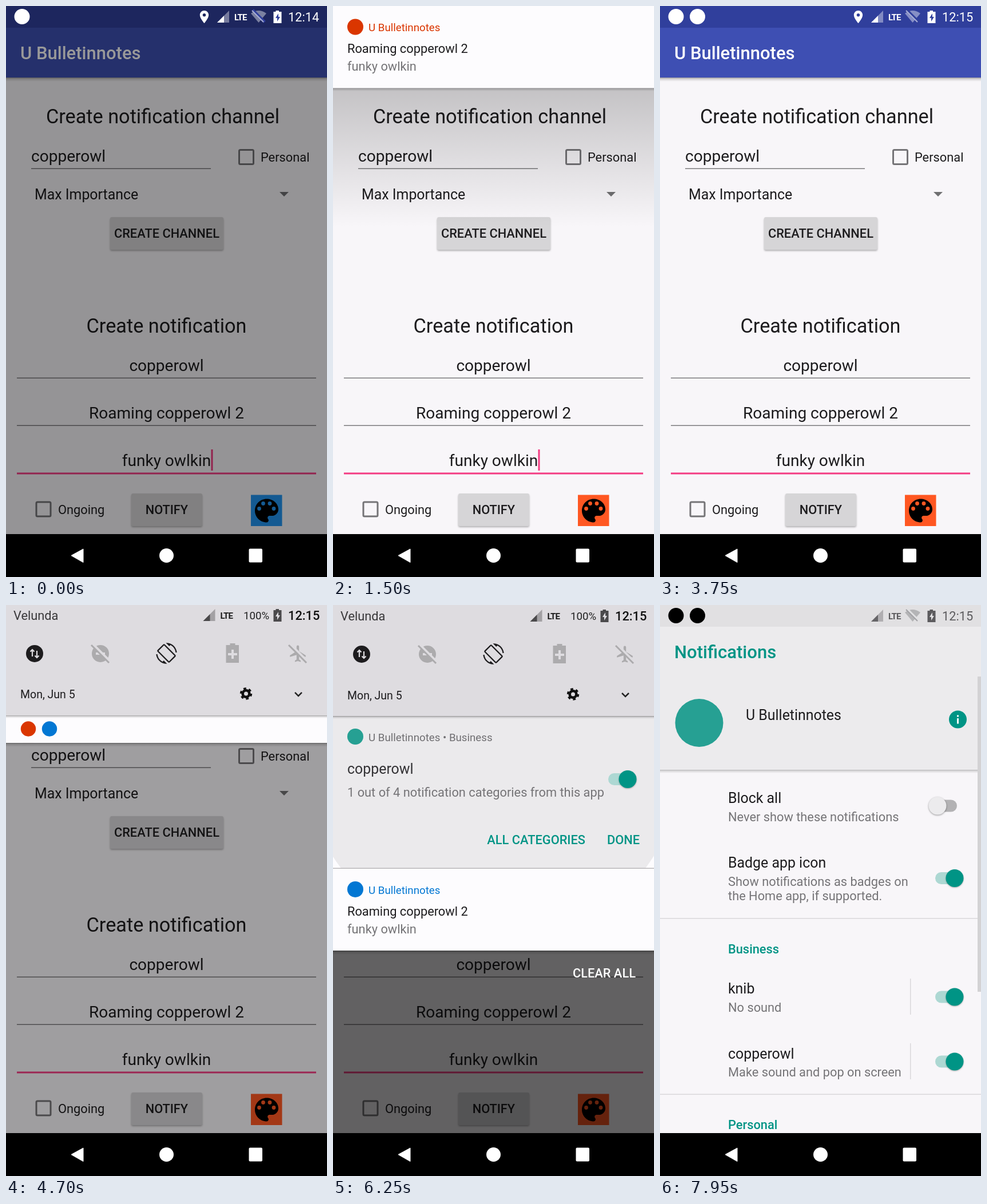
Animation of 561 by 998 pixels, one loop 8000 ms. Source, as an HTML page:

```html
<!DOCTYPE html>
<html lang="en">
<head>
<meta charset="utf-8">
<title>Notification channels</title>
<style>
html, body { margin: 0; width: 100%; height: 100%; overflow: hidden; background: #000; }
svg { display: block; width: 100vw; height: 100vh; font-family: Roboto, "Noto Sans", sans-serif; }
text { white-space: pre; }
</style>
</head>
<body>
<svg id="stage" viewBox="0 0 561 998"></svg>
<script>
const LOOP = 8000;
const W = 561, NAV = 923, HEAD = 194, SHELF = 48;
const INK = '#1d1c1e', SOFT = '#757477', TEAL = '#009485', PINK = '#f43a82', PAPER = '#f8f6f9', CARD = '#fdfcfe';
const ORANGE = '#da3600', BLUE = '#0277d3', QS = '#dedce0';
const APP = 'U Bulletinnotes', CHANNEL = 'copperowl', TITLE = 'Roaming copperowl 2', BODY = 'funky owlkin';

// drawing helpers
const text = (x, y, size, str, fill = INK, anchor = 'start', weight = 400, extra = '') =>
  `<text x="${x}" y="${y}" font-size="${size}" fill="${fill}" text-anchor="${anchor}" font-weight="${weight}" ${extra}>${str}</text>`;
const rect = (x, y, w, h, fill, extra = '') => `<rect x="${x}" y="${y}" width="${w}" height="${h}" fill="${fill}" ${extra}/>`;
const disc = (x, y, r, fill, extra = '') => `<circle cx="${x}" cy="${y}" r="${r}" fill="${fill}" ${extra}/>`;
const path = (d, fill, extra = '') => `<path d="${d}" fill="${fill}" ${extra}/>`;
const line = (d, color, width, extra = '') => path(d, 'none', `stroke="${color}" stroke-width="${width}" ${extra}`);
const group = (id, body, extra = '') => `<g id="${id}" ${extra}>${body}</g>`;
const icon = (cx, cy, s, d, fill) => path(d, fill, `fill-rule="evenodd" transform="translate(${cx} ${cy}) scale(${s}) translate(-12 -12)"`);
const checkbox = (x, y) => rect(x, y, 25, 25, 'none', 'rx="2" stroke="#757477" stroke-width="3"');
const button = (id, x, y, w, h, label) =>
  rect(x, y, w, h, '#d6d5d7', `id="${id}" rx="3" style="filter:drop-shadow(0 2px 1.5px rgba(0,0,0,.28))"`) +
  text(x + w / 2, y + 36, 21.8, label, INK, 'middle', 500);

const PALETTE = 'M12 3c-4.97 0-9 4.03-9 9s4.03 9 9 9c.83 0 1.5-.67 1.5-1.5 0-.39-.15-.74-.39-1.01-.23-.26-.38-.61-.38-.99 0-.83.67-1.5 1.5-1.5H16c2.76 0 5-2.24 5-5 0-4.42-4.03-8-9-8z';
const PIN = 'M12 2C8.13 2 5 5.13 5 9c0 5.25 7 13 7 13s7-7.75 7-13c0-3.87-3.13-7-7-7zm0 9.5a2.5 2.5 0 1 1 0-5 2.5 2.5 0 0 1 0 5z';
const PLANE = 'M13.5 9V3.5a1.5 1.5 0 0 0-3 0V9l-8 5v2l8-2.5V19l-2 1.5V22l3.5-1 3.5 1v-1.5L13.5 19v-5.5l8 2.5v-2z';
const ROTATE = 'M16.48 2.52c3.27 1.55 5.61 4.72 5.97 8.48h1.5C23.44 4.84 18.29 0 12 0l-.66.03 3.81 3.81zM10.23 1.75c-.59-.59-1.54-.59-2.12 0L1.75 8.11c-.59.59-.59 1.54 0 2.12l12.02 12.02c.59.59 1.54.59 2.12 0l6.36-6.36c.59-.59.59-1.54 0-2.12zM14.83 21.19L2.81 9.17l6.36-6.36 12.02 12.02zM7.52 21.48C4.25 19.94 1.91 16.76 1.55 13H.05C.56 19.16 5.71 24 12 24l.66-.03-3.81-3.81z';

const signal = (dx, color, ink) => `<g transform="translate(${dx} 0)">` +
  path('M369 29H390V8Z', color, 'opacity=".4"') + path('M369 29H381V17Z', color) +
  text(399, 25, 15, 'LTE', ink, 'start', 700, 'letter-spacing="-1"') + '</g>';
const battery = (color, bolt) => path('M471.5 10V8h5.500v2h4.500v20h-14V10Z', color) +
  path('M476 13l-5 8h3v6l5-8h-3z', bolt);
const wifiOff = (color, back) => path('M428 13Q441.500 3 455 13L441.500 29Z', color, 'opacity=".42"') +
  line('M431 7L452 28', back, 5) + line('M430 8L450 28', color, 2, 'opacity=".6"');
const dots = (color, id) => disc(28, 18.5, 13.5, color) + disc(65.5, 18.5, 13.5, color, `id="${id}"`);

function toggle(y, on = true) {
  return on
    ? rect(481, y - 10.5, 40, 21, '#add8d3', 'rx="10.5"') + disc(515, y, 15.5, TEAL, 'style="filter:drop-shadow(0 1px 1px rgba(0,0,0,.3))"')
    : rect(480, y - 10.5, 39, 21, '#b3b2b4', 'rx="10.5"') + disc(485, y, 15.5, '#ecebed', 'style="filter:drop-shadow(0 1px 1.5px rgba(0,0,0,.4))"');
}

function appScreen() {
  const field = (y, str) => text(280.5, y, 28.05, str, INK, 'middle');
  const rule = (x, y, w) => rect(x, y, w, 1.5, '#7b7a7c');
  return rect(0, 0, W, NAV, PAPER) +
    rect(0, 125, W, 7, 'url(#under)') +
    rect(0, 38, W, 87, '#3e4fb3') + rect(0, 0, W, 38, '#303f9c') +
    text(25, 93, 31, APP, '#fff', 'start', 500) +
    text(274, 205, 34.28, 'Create notification channel', INK, 'middle') +
    text(44, 272, 28.05, CHANNEL) + rule(44, 283.5, 314) +
    checkbox(407.5, 251.5) + text(445, 272, 21.8, 'Personal') +
    text(50, 337.5, 24.9, 'Max Importance') + path('M478 325H494L486 333Z', '#707072') +
    button('create', 182, 369, 198, 57, 'CREATE CHANNEL') +
    text(280.5, 570.5, 34.28, 'Create notification', INK, 'middle') +
    field(638, CHANNEL) + rule(19, 649.5, 523) +
    field(721, TITLE) + rule(19, 732.5, 523) +
    field(804, BODY) + rect(19, 815.5, 523, 3, PINK) +
    rect(358.5, 775, 3, 37, PINK, 'id="caret"') +
    checkbox(53, 867) + text(91, 888, 21.8, 'Ongoing') +
    button('notify', 219, 852, 124, 57, 'NOTIFY') +
    rect(428, 854.5, 54.5, 54.5, BLUE, 'id="swatch"') + icon(455.5, 882, 2.28, PALETTE, '#000') +
    group('wells', [[442.500, 878.5], [449.500, 869.500], [461, 869.500], [468, 878.500]].map(p => disc(...p, 3.4, 'inherit')).join(''));
}

function settingsScreen() {
  const row = (y, name, lines) => text(119, y, 24.9, name) +
    lines.map((s, i) => text(119, y + 31.5 + i * 25.6, 21.8, s, SOFT)).join('');
  const section = (y, s) => text(119, y, 21.8, s, TEAL, 'start', 500);
  const split = y => rect(0, y, W, 1.5, '#d9d7da');
  const bar = y => rect(437, y, 1.5, 63, '#dad8db');
  return rect(0, 0, W, NAV, PAPER) +
    rect(0, 287, W, 7, 'url(#under)') + rect(0, 0, W, 288, '#ecebed') + rect(0, 0, W, 38, '#e1e0e2') +
    text(25, 93, 31, 'Notifications', TEAL, 'start', 500) +
    disc(68.5, 206, 42, '#26a093') + text(150, 201, 24.9, APP) +
    disc(520.5, 200, 15.5, TEAL) + rect(519, 198, 3, 9.5, '#fff') + rect(519, 192.5, 3, 3, '#fff') +
    row(346, 'Block all', ['Never show these notifications']) + toggle(351, false) +
    row(459, 'Badge app icon', ['Show notifications as badges on', 'the Home app, if supported.']) + toggle(477.5) +
    split(547) + section(609, 'Business') +
    row(679, 'knib', ['No sound']) + bar(653) + toggle(685) +
    row(792.5, CHANNEL, ['Make sound and pop on screen']) + bar(766) + toggle(798) +
    split(854.5) + section(915.5, 'Personal') +
    rect(555, 125, 6, 551, '#d3d2d4');
}

const card = (color) => rect(0, 0, W, 143.5, CARD) + disc(39, 36.5, 14, color) +
  text(62, 44, 18.7, APP, color) + text(25, 82, 21.8, TITLE) + text(25, 113, 21.8, BODY, SOFT);

// channel settings revealed behind the first card
const guts = () => rect(0, HEAD, W, 267, '#ebeaec') + disc(39, 230, 14, '#26a093') +
  text(62, 237.5, 18.7, APP + ' • Business', '#706f72') + text(25, 295, 24.9, CHANNEL, '#333235') +
  text(25, 335, 21.8, '1 out of 4 notification categories from this app', SOFT) + toggle(304.5) +
  text(441, 418, 21.8, 'ALL CATEGORIES', TEAL, 'end', 500) + text(536, 418, 21.8, 'DONE', TEAL, 'end', 500);

function quickSettings() {
  const off = '#acabad', cut = x => line(`M${x - 14} 70L${x + 17} 101`, QS, 6) + line(`M${x - 16} 71L${x + 15} 102`, off, 3);
  return rect(0, -300, W, HEAD + 300, QS) + rect(0, HEAD, W, 5, 'url(#under)') +
    text(13, 27, 21.8, 'Velunda', '#3a393b') + signal(-24.5, '#4a494b', '#1c1c1c') +
    text(415, 26, 18.7, '100%', '#222') + battery('#4a494b', QS) + text(493, 27, 21.8, '12:15', '#111', 'start', 500) +
    disc(50, 86, 15, INK) + line('M46 91V79M42.500 82.500L46 79L49.500 82.500M54 81V93M50.500 89.500L54 93L57.500 89.500', QS, 2.2) +
    disc(165, 86, 15, off) + rect(157, 84, 16, 4, QS) + cut(165) +
    icon(280.5, 85.5, 1.52, ROTATE, INK) +
    path('M391.500 71V68h9v3h6.500v31h-22.500V71Z', off) + line('M396 79V95M388 87H404', QS, 4) +
    icon(510, 86, 1.45, PLANE, off) + cut(510) +
    text(25, 164.5, 19.5, 'Mon, Jun 5') +
    disc(419.5, 156, 5.8, 'none', 'stroke="#111" stroke-width="4.6"') +
    disc(419.5, 156, 8.5, 'none', 'stroke="#111" stroke-width="4.4" stroke-dasharray="4.45"') +
    line('M505 154L511 160L517 154', '#222', 2.5);
}

const grad = (id, ...stops) => `<linearGradient id="${id}" x2="0" y2="1">` +
  stops.map(([o, a]) => `<stop offset="${o}" stop-opacity="${a}"/>`).join('') + '</linearGradient>';

document.getElementById('stage').innerHTML =
  '<defs>' + grad('under', [0, .38], [.35, .15], [1, 0]) + grad('dusk', [0, .32], [.373, .21], [1, 0]) +
  `<clipPath id="panelClip">${rect(0, 0, W, 0, '#000', 'id="panelBox"')}</clipPath>` +
  `<clipPath id="gutsClip">${disc(280, 265, 0, '#000', 'id="gutsHole"')}</clipPath></defs>` +
  group('app', appScreen()) + group('settings', settingsScreen()) +
  rect(0, 0, W, NAV, '#000', 'id="scrim"') +
  group('appStatus', dots('#fff', 'second') + icon(346.5, 19, 1.1, PIN, '#fff') + signal(0, '#fff', '#fff') +
    wifiOff('#fff', '#303f9c') + battery('#fff', '#303f9c') + text(493, 27, 21.8, '12:14', '#fff', 'start', 400, 'id="clock"')) +
  group('setStatus', dots('#000', 'third') + signal(0, '#666568', '#5a595c') + wifiOff('#777679', '#e1e0e2') +
    battery('#5c5b5e', '#e1e0e2') + text(493, 27, 21.8, '12:15', '#5c5b5e')) +
  rect(0, 0, W, 386, 'url(#dusk)', 'id="dusk1"') +
  group('headsUp', rect(0, 143, W, 6, 'url(#under)') + card(ORANGE)) +
  group('shade',
    text(529, 0, 21.8, 'CLEAR ALL', '#fff', 'end', 500, 'id="clear"') +
    rect(0, 0, W, 7, 'url(#under)', 'id="edge"') +
    group('panel', rect(0, 0, W, 640, CARD) +
      group('first', card(ORANGE), `transform="translate(0 ${HEAD - .5})"`) +
      group('reveal', guts(), 'clip-path="url(#gutsClip)"') +
      group('lower', rect(0, 0, W, 143.5, CARD) + card(BLUE) + rect(0, -1, W, 1.5, '#b9b8ba')) +
      group('shelf', rect(0, 0, W, SHELF, CARD) + disc(39, 23.5, 13.2, ORANGE) + disc(76, 23.5, 13.2, BLUE)) +
      group('header', quickSettings()), 'clip-path="url(#panelClip)"')) +
  rect(0, NAV, W, 75, '#000') + path('M114 960.500L135 949V972.500Z', '#fff', 'stroke="#fff" stroke-linejoin="round"') +
  disc(280.5, 960.5, 12.5, '#fff') + rect(424.5, 948.5, 23.5, 24, '#fff', 'rx="2"');

const el = {};
document.querySelectorAll('[id]').forEach(n => el[n.id] = n);
const set = (id, attr, v) => el[id].setAttribute(attr, v);
const show = (id, on) => set(id, 'display', on ? 'inline' : 'none');
const moveY = (id, y) => set(id, 'transform', `translate(0 ${y})`);
const ramp = (t, a, b) => Math.min(1, Math.max(0, (t - a) / (b - a)));
const easeOut = p => 1 - (1 - p) ** 2;
const smooth = p => p * p * (3 - 2 * p);

function render(t) {
  // app
  const hue = t < 500 ? '#2196f3' : '#ff5722';
  set('swatch', 'fill', hue);
  set('wells', 'fill', hue);
  el.clock.textContent = t < 500 ? '12:14' : '12:15';
  show('second', t > 1300);
  show('caret', t < 1550 || (t < 4550 && Math.floor((t - 50) / 250) % 2 === 1));
  const lift = ramp(t, 500, 620) - ramp(t, 1050, 1200);
  el.notify.style.filter = `drop-shadow(0 ${2 + 3 * lift}px ${1.5 + 2 * lift}px rgba(0,0,0,.28))`;

  // heads-up banner
  const pop = easeOut(ramp(t, 1150, 1500)) - smooth(ramp(t, 3400, 3720));
  show('headsUp', pop > 0);
  moveY('headsUp', -152 * (1 - pop));
  set('dusk1', 'opacity', pop);

  // settings screen slides in below the shade
  const enter = easeOut(ramp(t, 6960, 7200));
  set('settings', 'opacity', enter);
  moveY('settings', 80 * (1 - enter));
  show('settings', enter > 0);
  show('appStatus', enter < .5);
  show('setStatus', enter >= .5);

  // notification shade
  const open = easeOut(ramp(t, 4578, 4998));
  const grow = smooth(ramp(t, 5480, 5880));
  const close = smooth(ramp(t, 7320, 7760));
  const full = 482 + 122 * grow;
  const h = full * open * (1 - close);
  const frac = h / full;
  set('scrim', 'opacity', t < 400 ? .4 * (1 - ramp(t, 0, 300)) : .605 * frac ** .74);
  show('shade', h > 0);
  set('panelBox', 'height', h);
  set('edge', 'y', h);
  moveY('header', Math.min(0, h - SHELF - HEAD));
  moveY('lower', 338 + 122.5 * grow);
  set('gutsHole', 'r', 330 * grow);
  moveY('shelf', h - SHELF);
  show('shelf', h < full - 12);
  set('clear', 'y', h + 47);
  set('clear', 'opacity', ramp(t, 5120, 5400) * (1 - ramp(t, 7320, 7420)));
}

const start = performance.now();
function tick() {
  render((performance.now() - start) % LOOP);
  requestAnimationFrame(tick);
}
render(0);
requestAnimationFrame(tick);
</script>
</body>
</html>
```
